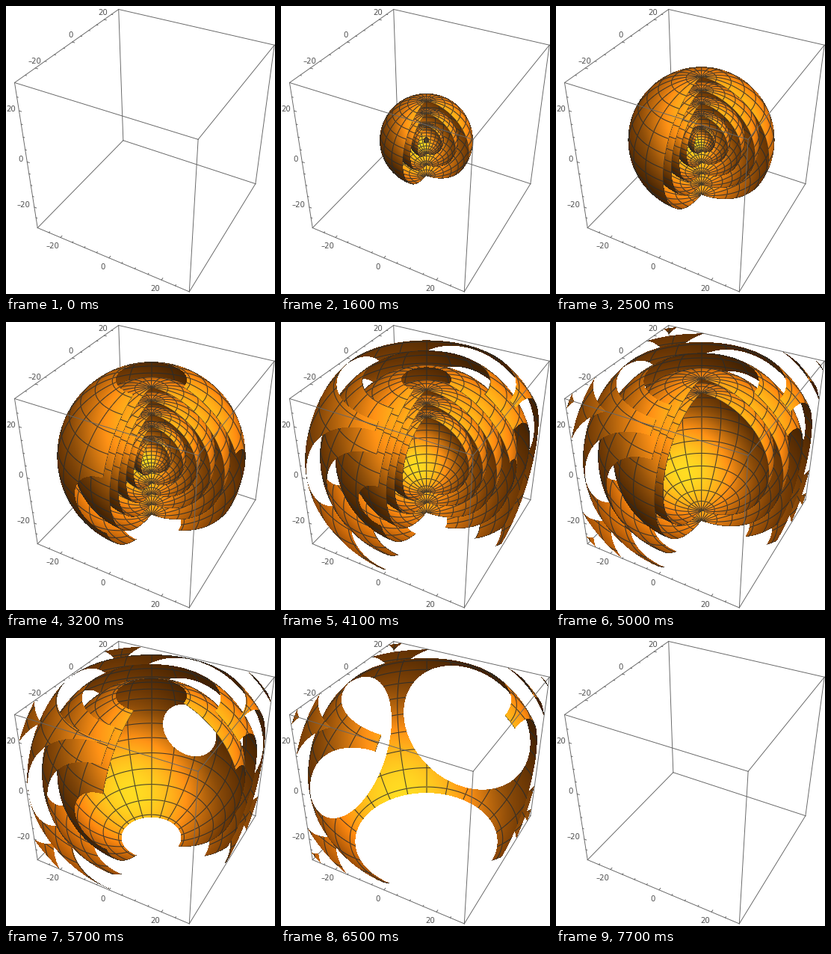
A matplotlib script for the animation above (8000 ms loop, 360x385 px).

```python
import numpy as np
import matplotlib.pyplot as plt
from matplotlib.animation import FuncAnimation

W, H, DPI = 360, 385, 100
FRAMES, INTERVAL = 80, 100
HALF = 30                         # the box spans -HALF..HALF on each axis
SHELLS, GAP = 6, 5                # shells emitted, frames between them
CX, CY, ZOOM = 194.5, 179.2, 790

# Camera: perspective view towards the box centre
eye = np.array([1.3, -2.4, 2.0]) * 2 * HALF
fwd = -eye / np.linalg.norm(eye)
right = np.cross(fwd, [0, 0, 1])
right /= np.linalg.norm(right)
up = np.cross(right, fwd)
view = np.array([right, up, -fwd])

# Surface material and lights, directions in camera space
BASE = np.array([0.881, 0.611, 0.142])
AMBIENT = np.array([0.301, 0.224, 0.090])
LIGHT = np.array([0.264, 0.183, 0.043])
MESH_COLOR = np.array([0.15, 0.17, 0.18])
MESH = 16                         # mesh divisions per parameter
LINE_COLOR, TEXT_COLOR = "#666666", "#505050"


def unit(v):
    return v / np.linalg.norm(v, axis=-1, keepdims=True)


lights = unit(np.array([[-1, 3, 3], [3, 3, 3], [3, -1, 3]]))
halves = unit(lights + [0, 0, 1])

# One ray per pixel
px, py = np.meshgrid(np.arange(W) + 0.5, np.arange(H) + 0.5)
rays = (((px - CX) / ZOOM)[..., None] * right
        + ((CY - py) / ZOOM)[..., None] * up + fwd).reshape(-1, 3)
ray_a = (rays ** 2).sum(1)
ray_b = rays @ eye
eye_sq = eye @ eye


def project(p):
    q = np.asarray(p, float) - eye
    depth = q @ fwd
    return CX + ZOOM * (q @ right) / depth, CY - ZOOM * (q @ up) / depth


def mesh_cover(angle, step, radius, along, d, scale):
    """Coverage of the mesh lines at multiples of step, one pixel wide."""
    q = angle / step
    arc = np.abs(q - np.round(q)) * step * radius
    slant = np.sqrt(np.maximum(1 - (along * d).sum(1) ** 2, 1e-6))
    return np.clip(1.05 - arc * scale / slant, 0, 1)


def shade(p, ray, depth, r):
    n = p / r
    d = unit(ray)
    facing = (n * d).sum(1)
    nc = (-np.sign(facing)[:, None] * n) @ view.T
    diffuse = np.clip(nc @ lights.T, 0, 1).sum(1)[:, None]
    gloss = (np.clip(nc @ halves.T, 0, 1) ** 3).sum(1)[:, None]
    color = np.clip(BASE * (AMBIENT + LIGHT * diffuse) + LIGHT * gloss, 0, 1)

    x, y, z = n.T
    rho = np.sqrt(x * x + y * y) + 1e-9
    theta = np.arctan2(rho, z)
    phi = np.arctan2(y, x) % (2 * np.pi)
    east = np.stack([-y / rho, x / rho, 0 * x], 1)
    south = np.stack([z * x / rho, z * y / rho, -rho], 1)
    scale = np.abs(facing) * ZOOM / depth
    line = np.maximum(
        mesh_cover(theta, np.pi / MESH, r, east, d, scale),
        mesh_cover(phi, 1.5 * np.pi / MESH, r * rho, south, d, scale))
    line = 0.85 * line[:, None]
    return color * (1 - line) + MESH_COLOR * line


def render(n):
    """Trace the growing shells, front to back, with a quadrant cut away."""
    img = np.zeros((W * H, 4))
    radii = [n - GAP * k for k in range(SHELLS)
             if 0 < n - GAP * k < HALF * np.sqrt(3)]
    passes = [(r, -1) for r in radii] + [(r, 1) for r in radii[::-1]]
    if not passes:
        return img.reshape(H, W, 4)
    live = np.flatnonzero(ray_b ** 2 > ray_a * (eye_sq - radii[0] ** 2))
    for r, side in passes:
        disc = ray_b[live] ** 2 - ray_a[live] * (eye_sq - r * r)
        hit = disc > 0
        i = live[hit]
        t = (side * np.sqrt(disc[hit]) - ray_b[i]) / ray_a[i]
        p = eye + t[:, None] * rays[i]
        x, y, z = p.T
        ok = (np.abs(x) <= HALF) & (np.abs(y) <= HALF) & (np.abs(z) <= HALF)
        ok &= (x <= 0) | (y >= 0)
        i = i[ok]
        img[i, :3] = shade(p[ok], rays[i], t[ok], r)
        img[i, 3] = 1
        live = live[img[live, 3] == 0]
    return img.reshape(H, W, 4)


fig = plt.figure(figsize=(W / DPI, H / DPI), dpi=DPI, facecolor="white")
ax = fig.add_axes([0, 0, 1, 1])
picture = ax.imshow(np.zeros((H, W, 4)), extent=(0, W, H, 0),
                    interpolation="nearest", aspect="auto", zorder=2)
ax.set_xlim(0, W)
ax.set_ylim(H, 0)
ax.axis("off")


def segment(p, q, zorder=3):
    (x0, y0), (x1, y1) = project(p), project(q)
    ax.plot([x0, x1], [y0, y1], color=LINE_COLOR, lw=0.68, zorder=zorder)


# Box edges; the three meeting at the far corner lie behind the shells
far = np.array([-HALF, HALF, -HALF])
for axis in range(3):
    for a in (-HALF, HALF):
        for b in (-HALF, HALF):
            p = np.insert([a, b], axis, -HALF)
            q = np.insert([a, b], axis, HALF)
            hidden = (p == far).all() or (q == far).all()
            segment(p, q, 1 if hidden else 3)


def ruler(axis, fixed, inward, offsets):
    for v in range(-25, 26, 5):
        p = np.insert(np.array(fixed, float), axis, v)
        major = v % 20 == 0
        segment(p, p + np.array(inward) * (0.9 if major else 0.5))
        if major:
            x, y = project(p)
            dx, dy = offsets[v // 20 + 1]
            ax.text(x + dx, y + dy, str(v).replace("-", "\u2013"),
                    family="DejaVu Sans", size=7.4, color=TEXT_COLOR,
                    ha="center", va="center_baseline", zorder=4)


ruler(0, (-HALF, -HALF), (0, 1, 0), [(-11, 11), (-8, 11), (-8, 11)])
ruler(1, (-HALF, HALF), (1, 0, 0), [(-1, -10), (-2, -10), (-2, -10)])
ruler(2, (-HALF, -HALF), (1, 0, 0), [(-14, -4), (-9, -4), (-11, -3)])


def update(n):
    picture.set_data(render(n))
    return (picture,)


anim = FuncAnimation(fig, update, frames=FRAMES, interval=INTERVAL,
                     repeat=True, repeat_delay=0, blit=False)
plt.show()
```
